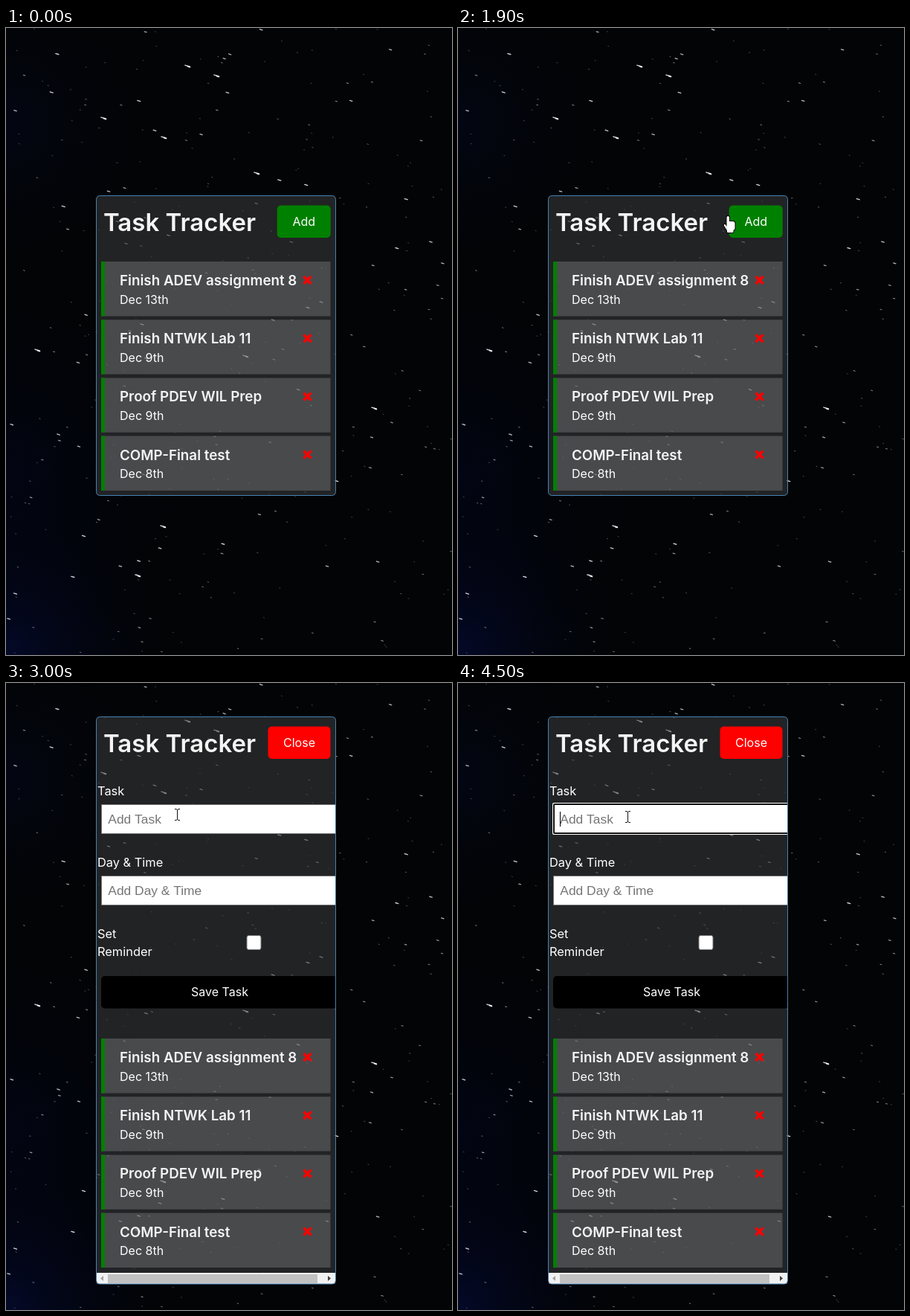
Animation, 600 px wide and 843 px high, one loop 5 s. Source, as an HTML page with a canvas:

```html
<!DOCTYPE html>
<html lang="en">
<head>
<meta charset="utf-8">
<title>Task Tracker</title>
<style>
  html, body { margin: 0; width: 100%; height: 100%; overflow: hidden; background: #020305; }
  canvas { display: block; width: 600px; height: 843px; }
</style>
</head>
<body>
<canvas id="stage" width="600" height="843"></canvas>
<script>
const W = 600, H = 843, LOOP = 5000, STEP = 100;
const PRESS = 2400, OPEN = 2500, FOCUS = 3500, BLINK = 500;
const ctx = document.getElementById('stage').getContext('2d');
const UI = 'Poppins, Inter, "Open Sans", sans-serif';
const FIELD = '"Liberation Sans", Arial, sans-serif';

const tasks = [
  ['Finish ADEV assignment 8', 'Dec 13th'],
  ['Finish NTWK Lab 11', 'Dec 9th'],
  ['Proof PDEV WIL Prep', 'Dec 9th'],
  ['COMP-Final test', 'Dec 8th']
];

// Pointer glides: it sets off at `from` and rests at x, y from `to` on.
const glides = [
  { from: 600, to: 600, x: 0, y: 207 },
  { from: 700, to: 1000, x: 94, y: 296 },
  { from: 1100, to: 1300, x: 294, y: 262 },
  { from: 1300, to: 1400, x: 268, y: 257 },
  { from: 1500, to: 2100, x: 414, y: 268 },
  { from: 2100, to: 2200, x: 394, y: 273 },
  { from: 2800, to: 3000, x: 230, y: 177 },
  { from: 3200, to: 3400, x: 228, y: 180 }
];

const bright = [[177, 736], [211, 670], [283, 64], [495, 511], [42, 433],
  [131, 121], [212, 147], [322, 441], [244, 51], [337, 195]];

function random(seed) {
  return () => (seed = seed * 16807 % 2147483647) / 2147483647;
}

function makeSky() {
  const sky = document.createElement('canvas');
  sky.width = W;
  sky.height = H;
  const c = sky.getContext('2d');
  c.fillStyle = '#020405';
  c.fillRect(0, 0, W, H);

  const glow = (x, y, r, color) => {
    const g = c.createRadialGradient(x, y, 0, x, y, r);
    g.addColorStop(0, color);
    g.addColorStop(1, 'transparent');
    c.fillStyle = g;
    c.fillRect(0, 0, W, H);
  };
  glow(0, 840, 260, 'rgba(5,14,70,0.6)');
  glow(0, 600, 340, 'rgba(3,6,40,0.4)');
  glow(0, 130, 260, 'rgba(5,10,40,0.4)');

  const streak = (x, y, len, width, alpha) => {
    c.strokeStyle = `rgba(240,244,255,${alpha})`;
    c.lineWidth = width;
    c.beginPath();
    c.moveTo(x - len / 2, y - len * 0.15);
    c.lineTo(x + len / 2, y + len * 0.15);
    c.stroke();
  };
  const rnd = random(41);
  c.lineCap = 'round';
  for (let i = 0; i < 340; i++) {
    const size = rnd() ** 3;
    streak(rnd() * W, rnd() * H, 1 + size * 3, 0.9 + size * 0.5, 0.3 + size * 0.6);
  }
  for (const [x, y] of bright) {
    streak(x, y, 6, 1.5, 0.9);
    streak(x + 2, y + 1, 2.5, 2, 1);
  }
  return sky;
}
const sky = makeSky();

function box(x, y, w, h, r, fill, line) {
  ctx.beginPath();
  ctx.roundRect(x, y, w, h, r);
  if (fill) { ctx.fillStyle = fill; ctx.fill(); }
  if (line) { ctx.strokeStyle = line; ctx.lineWidth = 1; ctx.stroke(); }
}

function text(s, x, y, { size = 16, weight = 400, color = '#fff', font = UI, align = 'left' } = {}) {
  ctx.font = `${weight} ${size}px ${font}`;
  ctx.textAlign = align;
  ctx.fillStyle = color;
  ctx.fillText(s, x, y);
}

function drawButton(label, x, y, w, color, scale = 1) {
  ctx.save();
  ctx.translate(x + w / 2, y + 21.75);
  ctx.scale(scale, scale);
  box(-w / 2, -21.75, w, 43.5, 5, color);
  text(label, 0, 5.7, { align: 'center' });
  ctx.restore();
}

function drawCross(x, y) {
  ctx.strokeStyle = '#f00';
  ctx.lineWidth = 3.6;
  ctx.beginPath();
  for (const s of [-1, 1]) {
    ctx.moveTo(x - 5, y - 5 * s);
    ctx.lineTo(x + 5, y + 5 * s);
  }
  ctx.stroke();
}

function drawCards(top) {
  tasks.forEach(([title, day], i) => {
    const y = top + i * 78.2;
    box(128, y, 308.5, 73.4, 0, 'rgba(200,203,207,0.23)');
    box(128, y, 5, 73.4, 0, '#008000');
    text(title, 153, y + 32, { size: 18.8, weight: 600, color: '#f4f4f4' });
    text(day, 153, y + 56.5);
    drawCross(405.5, y + 25);
  });
}

function drawInput(y, hint, focused) {
  if (focused) {
    box(127, y - 2, 330, 43, 2, '#fff');
    box(128, y - 1, 330, 41, 2, '#101010');
    box(130, y + 1, 330, 37, 0, '#fff');
  } else {
    box(128.5, y + 0.5, 330, 39, 0, '#fff', '#767676');
  }
  text(hint, 137.3, y + 25.5, { size: 17.4, color: '#757575', font: FIELD });
}

function drawScrollArrow(x, dir, color) {
  ctx.fillStyle = color;
  ctx.beginPath();
  ctx.moveTo(x + 2 * dir, 800.5);
  ctx.lineTo(x - 2 * dir, 797);
  ctx.lineTo(x - 2 * dir, 804);
  ctx.fill();
}

function drawForm(t) {
  const caretOn = t >= FOCUS && Math.floor((t - FOCUS) / BLINK) % 2 === 0;
  text('Task', 123, 151, { size: 16.4 });
  drawInput(163, 'Add Task', t >= FOCUS);
  if (caretOn) box(137, 173, 1, 20, 0, '#000');
  text('Day & Time', 123, 247, { size: 16.4 });
  drawInput(259, 'Add Day & Time', false);
  text('Set', 123, 343, { size: 16.4 });
  text('Reminder', 123, 367, { size: 16.4 });
  box(324, 339.5, 19, 19, 2.5, '#fff', '#767676');
  box(128, 394, 330, 43.5, 5, '#000');
  text('Save Task', 287.5, 421, { align: 'center' });

  box(122, 793, 321, 15, 0, '#f1f1f1');
  box(137, 795, 282, 12, 0, '#c1c1c1');
  drawScrollArrow(129, -1, '#a3a3a3');
  drawScrollArrow(435, 1, '#404040');
}

function fillOutlined(path) {
  ctx.lineWidth = 2;
  ctx.strokeStyle = '#000';
  ctx.fillStyle = '#fff';
  ctx.stroke(path);
  ctx.fill(path);
}

const arrow = new Path2D('M0 0V16L3.7 12.5L6.2 18.4L8.6 17.4L6.2 11.6H11.3Z');
const resize = new Path2D('M0 -1H6V-3.5L10.5 0L6 3.5V1H0Z');
const beam = new Path2D('M-3 -7.5H-1L.5 -6.5L2 -7.5H4M.5 -6.5V6.5M-3 7.5H-1L.5 6.5L2 7.5H4');
const hand = new Path2D();
hand.roundRect(-3.5, -11, 3.5, 15, 1.7);
hand.roundRect(-3.5, -4, 11, 12, 3);
hand.roundRect(-3, 3, 8.5, 8, 1);
hand.addPath(new Path2D('M-3.5 3L-6 -.5L-7.5 1L-3 8.5Z'));

function pointerShape(x, y, t) {
  const open = t >= OPEN;
  if (x < 12) return resize;
  if (!open && y > 245 && y < 280 && x > 132 && x < 335) return beam;
  if (x > 365 && y > 239 && y < 282) return hand;
  if (open && y > 163 && y < 203) return beam;
  return arrow;
}

function drawPointer(time) {
  const t = Math.floor(time / STEP) * STEP;
  let pos = null;
  for (const g of glides) {
    if (t < g.from) break;
    const from = pos || g;
    const k = g.to > g.from ? Math.min(1, (t - g.from) / (g.to - g.from)) : 1;
    pos = { x: from.x + (g.x - from.x) * k, y: from.y + (g.y - from.y) * k };
  }
  if (!pos) return;
  const path = pointerShape(pos.x, pos.y, t);
  ctx.save();
  ctx.translate(Math.round(pos.x), Math.round(pos.y));
  if (path === beam) {
    ctx.lineWidth = 1;
    ctx.strokeStyle = t < OPEN ? '#ddd' : '#111';
    ctx.stroke(beam);
  } else {
    fillOutlined(path);
  }
  ctx.restore();
}

function draw(t) {
  const open = t >= OPEN;
  const top = open ? 45 : 225;
  const height = open ? 763.5 : 404;
  ctx.drawImage(sky, 0, 0);

  ctx.save();
  ctx.beginPath();
  ctx.roundRect(121, top, 323, height, 5);
  ctx.clip();
  box(121, top, 323, height, 0, 'rgba(55,55,57,0.6)');
  text('Task Tracker', 131, top + 48, { size: 33, weight: 600, color: '#f4f4f4' });
  if (open) {
    drawButton('Close', 352.5, top + 13.5, 84, '#f00');
    drawForm(t);
  } else {
    drawButton('Add', 364.7, top + 13.5, 72, '#008000', t >= PRESS ? 0.98 : 1);
  }
  drawCards(open ? 478 : 314);
  ctx.restore();
  box(121.5, top + 0.5, 322, height - 1, 5, null, '#4682b4');

  drawPointer(t);
}

function tick() {
  draw(performance.now() % LOOP);
  requestAnimationFrame(tick);
}
tick();
</script>
</body>
</html>
```
